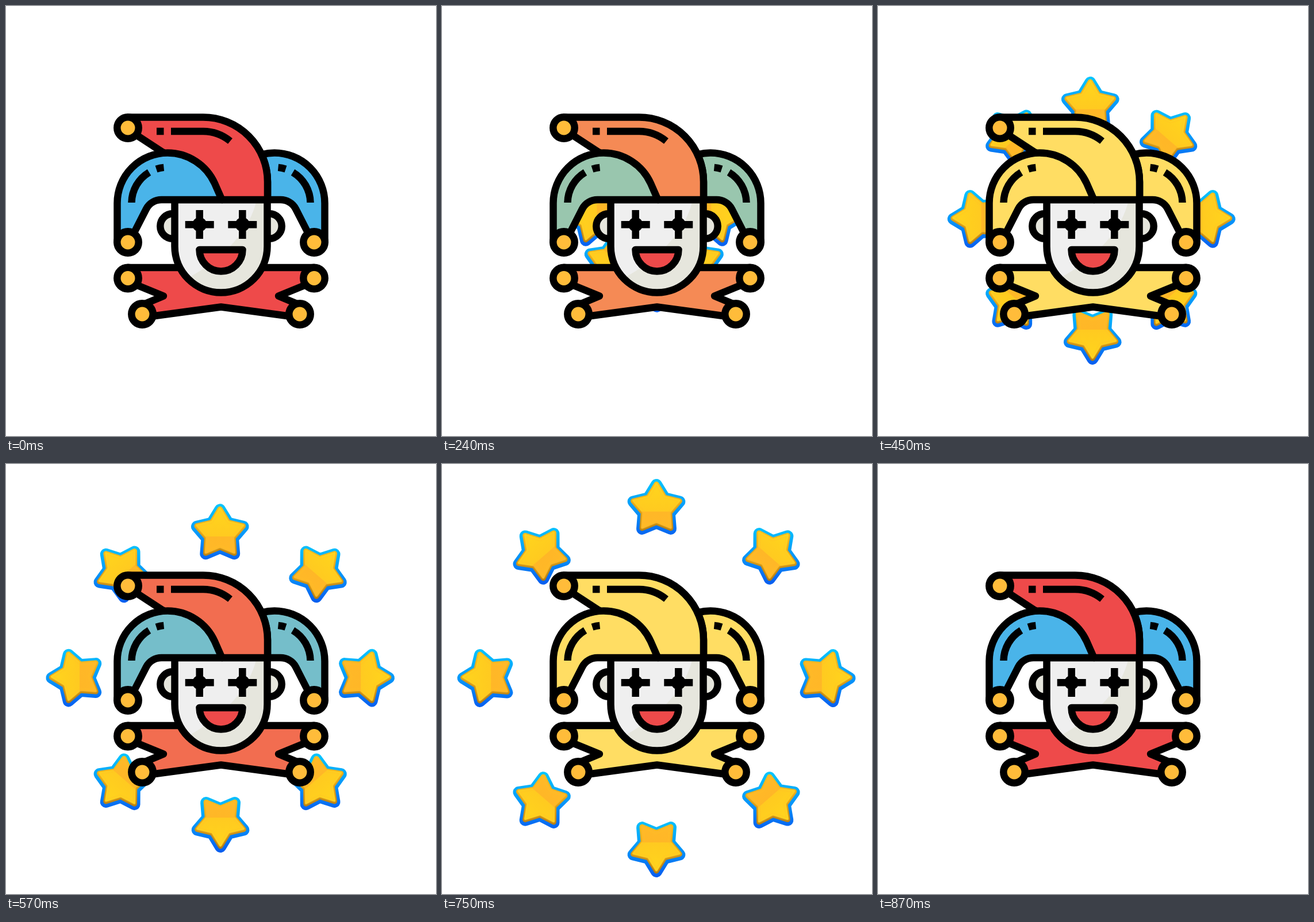
Write an HTML page with a canvas that moves like this. It is 748x748 px and loops after 0.9 s.

```html
<!DOCTYPE html>
<html>
<head>
<meta charset="utf-8">
<title>Jester with stars</title>
<style>
  html, body { margin: 0; width: 100%; height: 100%; overflow: hidden; background: #fff; }
  canvas { display: block; }
</style>
</head>
<body>
<canvas id="stage" width="748" height="748"></canvas>
<script>
const ctx = document.getElementById('stage').getContext('2d');
const SIZE = 748, LOOP = 900, STEP = 30, LINE = 12.5;
const RED = [238, 74, 74], BLUE = [74, 180, 233], YELLOW = [255, 221, 99];
const LIPS = '#ee4a4a', BELL = '#ffbc3a', SKIN = '#efefef', SHADE = '#e6e6dd';
const STAR_COUNT = 8, SLOWDOWN = 600;

const crown = new Path2D('M217 218 L212 193.5 H343 A112 112 0 0 1 455 306 V337 H376 L300 270 L272 254 Z');
const sideHat = new Path2D('M193.5 411 V343 A87.5 87.5 0 0 1 281 255.5 A90 90 0 0 1 363 308.5 L375.5 337 H271 A30 30 0 0 0 244 353 L222 396 Z');
const farHat = new Path2D('M554.5 411 V343 A87.5 87.5 0 0 0 467 255.5 Q456 255.5 444.4 258.5 A112 112 0 0 1 455 306 V337 H477 A30 30 0 0 1 504 353 L526 396 Z');
const face = new Path2D('M293.5 337 H454.5 V418 A80.5 80.5 0 0 1 293.5 418 Z');
const cheek = new Path2D('M436 337 H454.5 V418 A80.5 80.5 0 0 1 322 480 V470 C380 438 426 387 436 337 Z');
const collar = new Path2D('M212 455 H536 L524 484 L474 504.5 L511 520 V542 L374 523.5 L237 542 V520 L274 504.5 L224 484 Z');
const mouth = new Path2D('M336.5 424 H411.5 A37.5 37.5 0 0 1 336.5 424 Z');
const crownShine = new Path2D('M262 218 H274.5 M287 218 H343 Q369 218 390 235');
const sideShine = new Path2D('M218.5 342 A62.5 62.5 0 0 1 249 289.3 M261.5 283.6 A62.5 62.5 0 0 1 274.5 280.9');

const lerp = (a, b, k) => a + (b - a) * k;
const mix = (a, b, k) => `rgb(${a.map((v, i) => Math.round(lerp(v, b[i], k)))})`;

function outlined(path, fill) {
  ctx.fillStyle = fill;
  ctx.fill(path);
  ctx.stroke(path);
}

function disc(x, y, r, fill) {
  const path = new Path2D();
  path.arc(x, y, r, 0, Math.PI * 2);
  outlined(path, fill);
}

function mirrored(draw) {
  draw();
  ctx.save();
  ctx.translate(SIZE, 0);
  ctx.scale(-1, 1);
  draw();
  ctx.restore();
}

function starPath(turn) {
  const path = new Path2D();
  for (let i = 0; i < 10; i++) {
    const a = turn + i * Math.PI / 5, r = i % 2 ? 24 : 42.5;
    path.lineTo(r * Math.sin(a), -r * Math.cos(a));
  }
  path.closePath();
  return path;
}

function gradient(x, y, stops) {
  const g = ctx.createLinearGradient(-x, -y, x, y);
  stops.forEach(([at, color]) => g.addColorStop(at, color));
  return g;
}

function starLayer(path, paint, width) {
  ctx.strokeStyle = paint;
  ctx.lineWidth = width;
  outlined(path, paint);
}

function drawStar(x, y, turn) {
  const path = starPath(turn);
  ctx.save();
  ctx.translate(x, y);
  ctx.lineJoin = 'round';
  starLayer(path, gradient(0, 50, [[0, '#08c4ff'], [0.5, '#0798fa'], [1, '#075ff0']]), 20);
  ctx.translate(0, -1);
  starLayer(path, gradient(0, 45, [[0, '#fbc01d'], [0.5, '#dda01a'], [1, '#b27a12']]), 9);
  ctx.translate(0, -1);
  ctx.shadowColor = '#ffc024';
  ctx.shadowBlur = 3;
  const gold = gradient(-48 * Math.sin(turn), 48 * Math.cos(turn),
    [[0, '#ffd61c'], [0.56, '#ffca20'], [0.57, '#ffb727'], [1, '#ffb928']]);
  starLayer(path, gold, 3);
  ctx.restore();
}

// Stars fly from behind the face to a ring, then the ring keeps growing more slowly.
function drawStars(t) {
  const out = Math.min(t / SLOWDOWN, 1);
  const radius = 264 + 0.2 * Math.max(t - SLOWDOWN, 0);
  for (let i = 0; i < STAR_COUNT; i++) {
    const a = i * 2 * Math.PI / STAR_COUNT;
    const lean = 0.035 * Math.sin(2 * a), sway = Math.cos(2 * a);
    const x = lerp(366 - 8 * Math.cos(a) * sway, 373 + radius * Math.sin(a - lean), out);
    const y = lerp(370 + 6 * sway, 372.5 - radius * Math.cos(a - lean), out);
    drawStar(x, y, a - 2 * lean);
  }
}

function drawEye(x) {
  ctx.fillStyle = '#000';
  ctx.fillRect(x - 25, 374, 50, LINE);
  ctx.fillRect(x - LINE / 2, 355, LINE, 50);
  ctx.beginPath();
  ctx.arc(x, 380.2, 12.5, 0, Math.PI * 2);
  ctx.fill();
}

function drawFace() {
  mirrored(() => disc(290, 383, 21.7, SHADE));
  ctx.fillStyle = SKIN;
  ctx.fill(face);
  ctx.fillStyle = SHADE;
  ctx.fill(cheek);
  ctx.lineJoin = 'miter';
  ctx.stroke(face);
  ctx.lineJoin = 'round';
  mirrored(() => drawEye(336.7));
  outlined(mouth, LIPS);
}

function drawJester(glow) {
  const red = mix(RED, YELLOW, glow), blue = mix(BLUE, YELLOW, glow);
  ctx.strokeStyle = '#000';
  ctx.lineWidth = LINE;
  ctx.lineJoin = 'round';

  outlined(collar, red);
  drawFace();
  outlined(farHat, blue);
  outlined(crown, red);
  outlined(sideHat, blue);
  ctx.stroke(crownShine);
  mirrored(() => ctx.stroke(sideShine));

  disc(212, 212, 18.7, BELL);
  mirrored(() => {
    disc(212, 411, 18.7, BELL);
    disc(212, 473.5, 18.7, BELL);
    disc(237, 536, 18.7, BELL);
  });
}

function render(now) {
  let t = Math.floor(now % LOOP / STEP) * STEP;
  if (t === LOOP - STEP) t = 0; // the last step already rests in the opening pose
  const phase = t % 300 / 150;
  ctx.fillStyle = '#fff';
  ctx.fillRect(0, 0, SIZE, SIZE);
  drawStars(t);
  drawJester((1 - Math.abs(1 - phase)) ** 0.9);
}

let start;
function tick(now) {
  if (start === undefined) start = now;
  render(Math.max(0, now - start));
  requestAnimationFrame(tick);
}
render(0);
requestAnimationFrame(tick);
</script>
</body>
</html>
```
